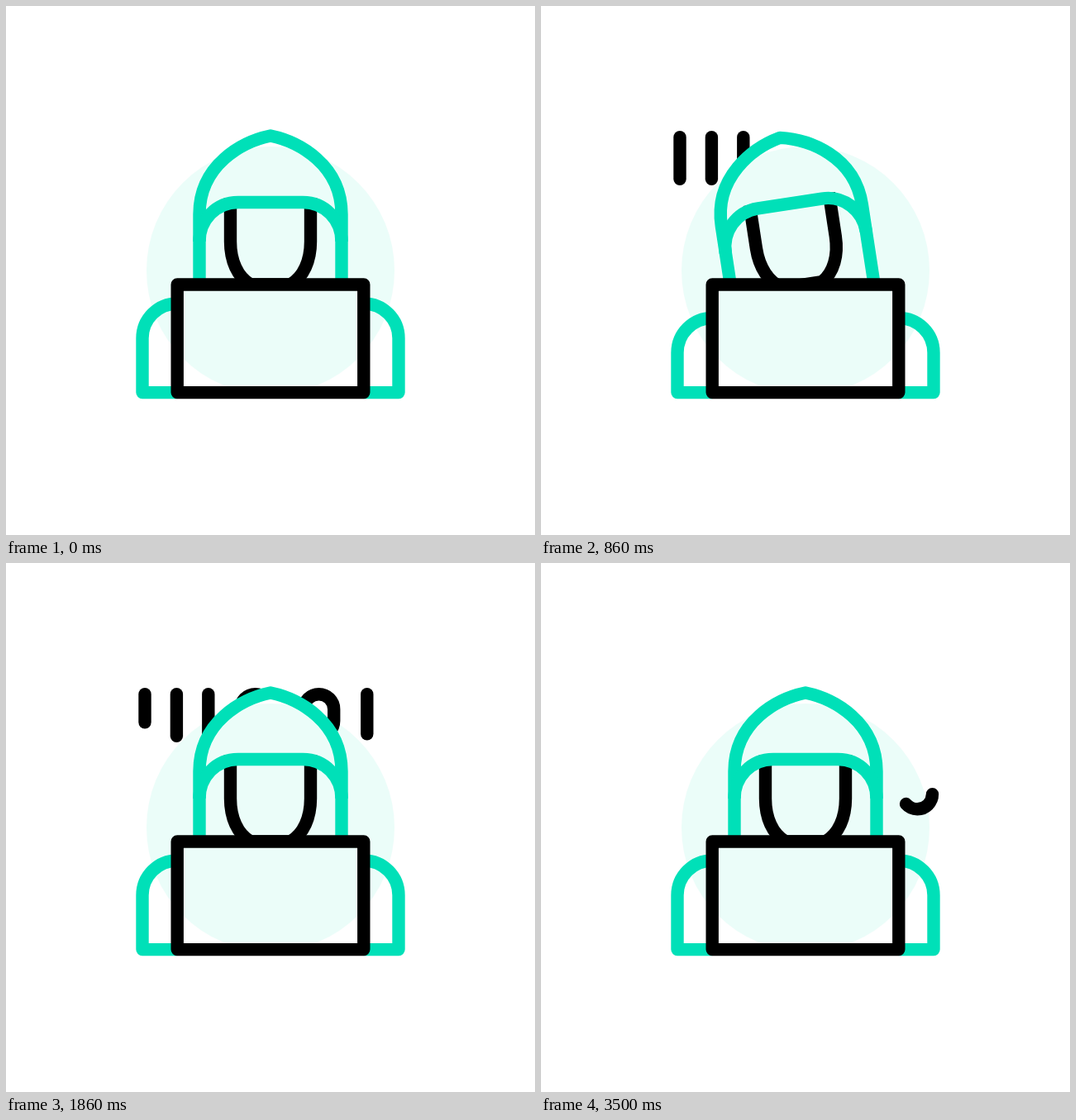
An HTML page with a canvas for the animation above (3570 ms loop, 640 px wide and 640 px high).

```html
<!DOCTYPE html>
<html lang="en">
<head>
<meta charset="utf-8">
<title>Hooded figure at a laptop</title>
<style>
html, body { margin: 0; width: 100%; height: 100%; overflow: hidden; background: #fff; }
canvas { display: block; width: 100vmin; height: 100vmin; margin: auto; }
</style>
</head>
<body>
<canvas id="stage" width="640" height="640"></canvas>
<script>
const ctx = document.getElementById('stage').getContext('2d');
const LOOP = 3570, TEAL = '#00e0b8', PALE = '#ebfdf9', INK = '#000';
const COL = 38.4, HEIGHT = 50.5, R = 18.2;

// Digits in typing order: [glyph, column, row top]
const digits = [
  [1, 0, 158.7], [1, 1, 158.7], [1, 2, 158.7], [0, 3, 158.7], [0, 5, 158.7],
  [1, 7, 158.7], [1, 8, 158.7], [0, 0, 247.3], [0, 7, 247.3]
];

// Poses: [seconds, head angle in degrees, shoulder drop]
const poses = [
  [0, 0, 0], [0.57, -8.4, 18.5], [0.86, -8.7, 17.5],
  [1.14, 13, 9], [1.28, 13, 9], [1.82, 0, 0]
];

const hood = new Path2D('M234 345V252C234 192 286 164 320 157C354 164 406 192 406 252V345');
const brow = new Path2D('M234 285C234 259 254 237.5 281 237.5H359C386 237.5 406 259 406 285');
const face = new Path2D('M271.5 232V285C271.5 308 280 328 296 337H344C360 328 368.5 308 368.5 285V232');

const behindLaptop = new Path2D();
behindLaptop.rect(0, 0, 640, 337);
behindLaptop.rect(0, 0, 207, 640);
behindLaptop.rect(433, 0, 207, 640);

function smooth(x) {
  x = Math.min(1, Math.max(0, x));
  return x * x * (3 - 2 * x);
}

function poseAt(t) {
  const next = poses.findIndex(p => p[0] > t);
  if (next < 0) return [0, 0];
  const a = poses[next - 1], b = poses[next];
  const k = smooth((t - a[0]) / (b[0] - a[0]));
  return [1, 2].map(i => a[i] + (b[i] - a[i]) * k);
}

function line(path, color) {
  ctx.strokeStyle = color;
  ctx.stroke(path);
}

function drawDigit([glyph, col, top], part) {
  if (part <= 0.001) return;
  const x = 168 + col * COL, path = new Path2D();
  let length = HEIGHT;
  if (glyph) {
    path.moveTo(x, top);
    path.lineTo(x, top + HEIGHT);
  } else {
    const low = top + HEIGHT - R;
    path.arc(x + R + 0.3, low, R, 0, Math.PI);
    path.arc(x + R + 0.3, top + R, R, Math.PI, 2 * Math.PI);
    path.lineTo(x + 2 * R + 0.3, low);
    length = 2 * Math.PI * R + 2 * (HEIGHT - 2 * R);
  }
  ctx.setLineDash(part < 1 ? [length * part, 999] : []);
  line(path, INK);
  ctx.setLineDash([]);
}

function inHead(angle, draw) {
  ctx.save();
  ctx.translate(320, 362);
  ctx.rotate(angle * Math.PI / 180);
  ctx.translate(-320, -362);
  draw();
  ctx.restore();
}

function drawDisc() {
  ctx.globalCompositeOperation = 'multiply';
  ctx.fillStyle = PALE;
  ctx.beginPath();
  ctx.arc(320, 320, 150, 0, 2 * Math.PI);
  ctx.fill();
  ctx.globalCompositeOperation = 'source-over';
}

function drawShoulder(drop) {
  const y = 402 + drop, path = new Path2D();
  path.arc(207, y, 42, -Math.PI / 2, Math.PI, true);
  path.lineTo(165, 467.6);
  path.lineTo(207, 467.6);
  line(path, TEAL);
}

function render(t) {
  const [angle, drop] = poseAt(t);
  ctx.fillStyle = '#fff';
  ctx.fillRect(0, 0, 640, 640);
  ctx.lineWidth = 15.4;
  ctx.lineJoin = ctx.lineCap = 'round';

  digits.forEach((digit, i) => {
    const typed = smooth((t - i * 0.32) / 0.3);
    const erased = smooth((t - 1.8 - i * 0.2) / 0.16);
    drawDigit(digit, typed - erased);
  });

  // The hood hides the digits behind it; the disc then tints the white.
  ctx.fillStyle = '#fff';
  inHead(angle, () => ctx.fill(hood));
  drawDisc();

  ctx.save();
  ctx.clip(behindLaptop);
  drawShoulder(drop);
  ctx.translate(640, 0);
  ctx.scale(-1, 1);
  drawShoulder(drop);
  ctx.restore();

  ctx.save();
  ctx.clip(behindLaptop);
  inHead(angle, () => {
    ctx.lineCap = 'butt';
    line(face, INK);
    line(hood, TEAL);
    line(brow, TEAL);
  });
  ctx.restore();

  ctx.strokeStyle = INK;
  ctx.strokeRect(207.2, 337, 225.6, 130.6);
}

function tick(now) {
  render(now % LOOP / 1000);
  requestAnimationFrame(tick);
}
requestAnimationFrame(tick);
</script>
</body>
</html>
```
